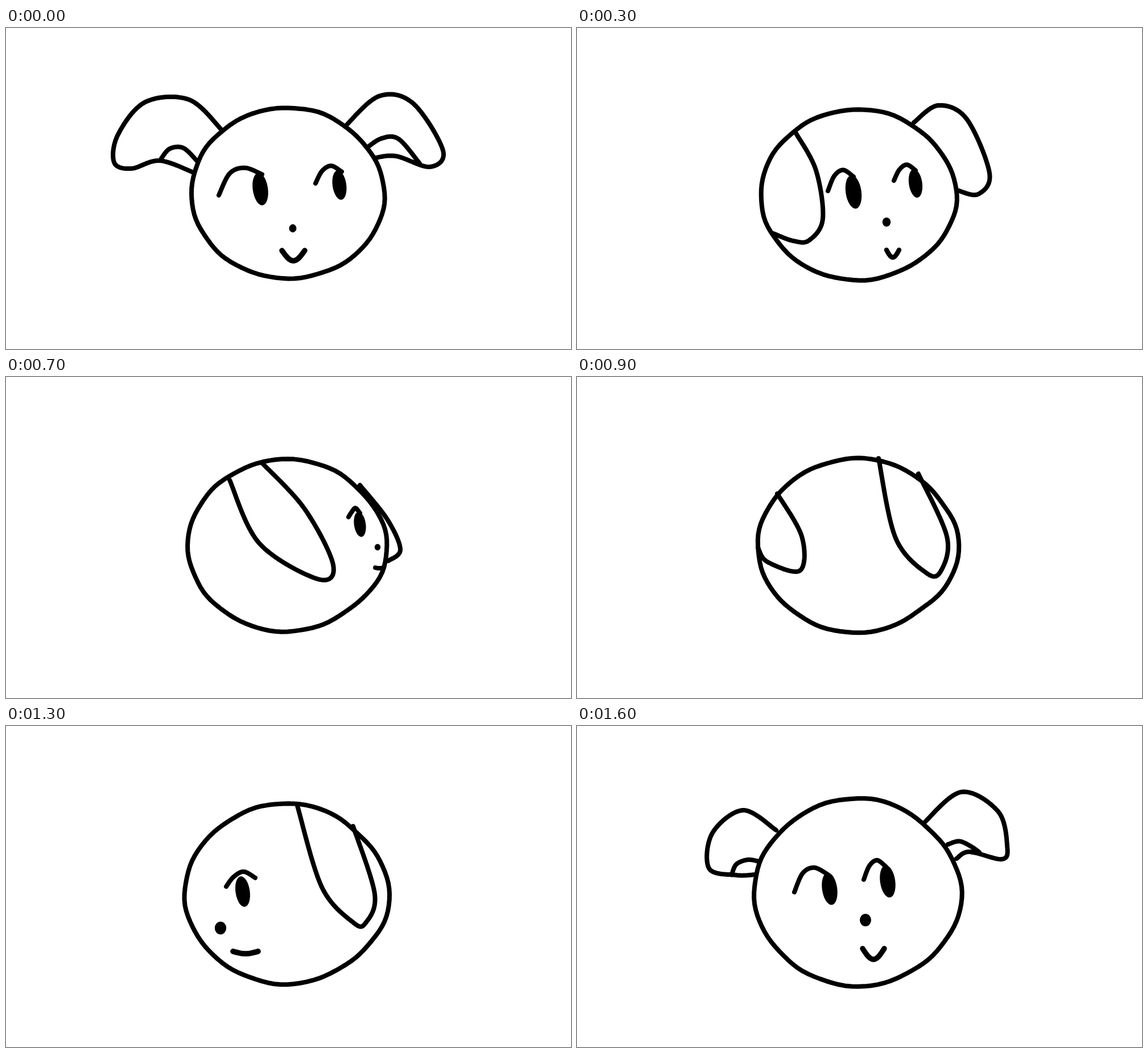
An HTML page with a canvas that plays this animation: 993x564 px, repeating every 1.7 s.

```html
<!DOCTYPE html>
<html lang="en">
<head>
<meta charset="utf-8">
<title>Turning head</title>
<style>
  html, body { margin: 0; width: 100%; height: 100%; overflow: hidden; background: #fff; }
  canvas { display: block; width: 993px; height: 564px; }
</style>
</head>
<body>
<canvas id="stage" width="993" height="564"></canvas>
<script>
const ctx = document.getElementById('stage').getContext('2d');
const STEP = 100, STEPS = 17, SAMPLES = 100, CENTER = 495;
const { PI, sin, cos, exp, sqrt, floor, min, max } = Math;

const mix = (a, b, t) => a + (b - a) * t;
const range = (count, make) => Array.from({ length: count + 1 }, (_, i) => make(i / count));

// Smooth Catmull-Rom curve through [x, y] points.
function curve(points) {
  const last = points.length - 1;
  return range(SAMPLES, u => {
    const i = min(last - 1, floor(u * last)), t = u * last - i;
    return [0, 1].map(axis => {
      const [a, b, c, d] = [-1, 0, 1, 2].map(k => points[max(0, min(last, i + k))][axis]);
      return b + t / 2 * (c - a + t * (2 * a - 5 * b + 4 * c - d + t * (3 * (b - c) + d - a)));
    });
  });
}

const pairs = flat => range(flat.length / 2 - 1, u => {
  const i = Math.round(u * (flat.length / 2 - 1));
  return [flat[2 * i], flat[2 * i + 1]];
});

const tracks = {};
const addKey = (name, step, values) => (tracks[name] ??= []).push({ step, values });
const part = (name, step, ...values) => addKey(name, step, values);
const outline = (name, step, ...flat) => addKey(name, step, curve(pairs(flat)).flat());

// Values of a part at a step, or null while the part is out of sight.
function pose(name, step) {
  const keys = tracks[name], next = keys.findIndex(k => k.step >= step);
  if (next < 0) return null;
  const b = keys[next], a = keys[next - 1];
  if (b.step === step) return b.values;
  if (!a) return null;
  const t = (step - a.step) / (b.step - a.step);
  return a.values.map((v, i) => mix(v, b.values[i], t));
}

// Ears: a few points from root to root
outline('firstEar', 0, 380,180, 322,126, 245,130, 197,187, 190,236, 220,247, 270,233, 330,254);
outline('firstEar', 3, 385,185, 420,250, 432,335, 408,373, 380,374, 345,361);
outline('firstEar', 5, 378,189, 450,250, 503,335, 480,364, 400,350, 324,288);
outline('firstEar', 7, 450,151, 525,232, 575,330, 548,355, 445,292, 393,181);
outline('firstEar', 9, 600,170, 650,280, 640,340, 615,345, 560,283, 530,143);
outline('firstEar', 11, 638,213, 661,240, 668,300, 666,313, 645,270, 638,215);

outline('farEar', 0, 594,175, 655,120, 715,132, 768,215, 745,244, 685,225, 645,229);
outline('farEar', 3, 592,166, 635,136, 685,160, 725,255, 705,292, 668,285);
outline('farEar', 5, 606,165, 665,228, 725,318, 690,335, 668,329);
outline('farEar', 7, 622,190, 670,250, 693,303, 672,323);

outline('secondEar', 9, 352,205, 395,280, 392,340, 335,325, 318,300);
outline('secondEar', 11, 428,155, 490,215, 542,340, 518,370, 415,305, 365,195);
outline('secondEar', 13, 610,176, 648,295, 632,346, 610,345, 555,283, 512,140);

outline('rightEar', 14, 605,172, 655,175, 708,270, 690,315, 665,312);
outline('rightEar', 16, 608,172, 675,116, 740,150, 756,210, 747,234, 690,221, 667,233);
outline('leftEar', 14, 345,200, 300,240, 290,285, 325,320);
outline('leftEar', 16, 350,183, 292,148, 238,188, 232,250, 280,262, 314,261);

outline('leftFold', 0, 337,235, 312,211, 288,212, 273,229);
outline('rightFold', 0, 632,212, 660,194, 690,195, 727,238);
outline('leftFoldEnd', 16, 320,238, 300,235, 280,243, 272,261);
outline('rightFoldEnd', 16, 652,208, 675,203, 707,222, 690,221);

// Eyes: pupil x, y, then how far the brow runs left and right of it
part('leftEye', 0, 447, 283, -73, 3);
part('leftEye', 3, 486, 288, -45, 0);
part('leftEye', 5, 577, 264, -32, -3);
part('leftEye', 7, 622, 259, -20, 0);
part('rightEye', 0, 586, 276, -42, 4);
part('rightEye', 3, 595, 273, -38, 0);
part('rightEye', 5, 641, 258, -19, -3);
part('returningEye', 11, 334, 337, -12, 28);
part('returningEye', 13, 416, 291, -29, 22);
part('returningEye', 16, 546, 273, -42, -3);
part('lastEye', 14, 372, 292, -37, 3);
part('lastEye', 16, 444, 286, -62, -4);

// Noses: x, y, size
part('nose', 0, 504, 352, 6.5);
part('nose', 3, 544, 341, 7.5);
part('nose', 5, 615, 323, 8.5);
part('nose', 7, 653, 299, 9.5);
part('returningNose', 11, 346, 379, 9);
part('returningNose', 13, 377, 355, 13);
part('returningNose', 16, 507, 341, 10);

// Mouths: x, y, half width, depth
part('mouth', 0, 505, 391, 20, 18);
part('mouth', 3, 555, 390, 11, 13);
part('mouth', 5, 621, 363, 7, 7);
part('mouth', 7, 656, 335, 7, 1);
part('returningMouth', 11, 376, 405, 6, 0);
part('returningMouth', 13, 421, 396, 22, 4);
part('returningMouth', 16, 521, 391, 19, 19);

// Features narrow as they near the side of the head.
const foreshorten = x => sqrt(1 - ((x - CENTER) / 190) ** 2);

function drawLine(points, width = 8, filled = false) {
  ctx.beginPath();
  points.forEach(p => ctx.lineTo(...p));
  ctx.fillStyle = '#fff';
  if (filled) ctx.fill();
  ctx.lineWidth = width;
  ctx.stroke();
}

function drawDot(x, y, rx, ry, tilt = 0) {
  ctx.fillStyle = '#000';
  ctx.beginPath();
  ctx.ellipse(x, y, rx, ry, tilt, 0, 2 * PI);
  ctx.fill();
}

// An ellipse that swells over the loop, with soft dents and a hand-drawn wobble.
function drawHead(step) {
  const turn = step / 16;
  const cx = CENTER + 1 - 2 * turn, cy = 290 + 6.5 * sin(PI * step / 18);
  const rx = 170 + 13 * turn, ry = 150 + 15.5 * turn ** 2.5;
  const dent = angle => exp(10 * (cos(angle) - 1));
  drawLine(range(SAMPLES, u => {
    const a = PI / 2 + 2 * PI * u;
    const wobble = .003 * sin(9 * a + 2.4 * step) + .002 * sin(14 * a + 4.1 * step);
    const r = 1 + wobble - .016 * turn * sin(2 * a) ** 2
      - .03 * dent(a + .65) - .035 * sin(PI * step / 17) * dent(a - .9);
    return [cx + rx * r * cos(a), cy + ry * r * sin(a)];
  }), 8, true);
}

function drawEye([x, y, from, to]) {
  const rx = 13.8 * foreshorten(x), ry = 2.15 * rx;
  const brow = [[0, -22 - .45 * from], [.25, -.95 * ry], [.6, -1.3 * ry], [1, -.9 * ry]];
  drawLine(curve(brow.map(([t, dy]) => [x + mix(from, to, t), y + dy])));
  drawDot(x, y, rx, ry, -.14);
}

function drawNose([x, y, size]) {
  drawDot(x, y, size * foreshorten(x), size * 1.1 * foreshorten(x));
}

function drawMouth([x, y, half, depth]) {
  drawLine(range(20, u => [x + half * (2 * u - 1), y + depth * sin(PI * u)]), 7 + half / 8);
}

const FOLDS = ['leftFold', 'rightFold', 'leftFoldEnd', 'rightFoldEnd'];

function drawScene(step) {
  const each = (names, draw) => names.map(n => pose(n, step)).filter(Boolean).forEach(draw);
  const behind = ['farEar', 'rightEar', 'leftEar'], front = ['secondEar'];
  (step < 2 ? behind : front).push('firstEar');

  ctx.fillStyle = '#fff';
  ctx.fillRect(0, 0, 993, 564);
  ctx.strokeStyle = '#000';
  ctx.lineCap = ctx.lineJoin = 'round';
  each(behind, ear => drawLine(pairs(ear), 8, true));
  each(FOLDS, fold => drawLine(pairs(fold)));
  drawHead(step);
  each(front, ear => drawLine(pairs(ear)));
  each(['leftEye', 'rightEye', 'returningEye', 'lastEye'], drawEye);
  each(['nose', 'returningNose'], drawNose);
  each(['mouth', 'returningMouth'], drawMouth);
}

const start = performance.now();
function tick() {
  drawScene(floor((performance.now() - start) / STEP) % STEPS);
  requestAnimationFrame(tick);
}
tick();
</script>
</body>
</html>
```
